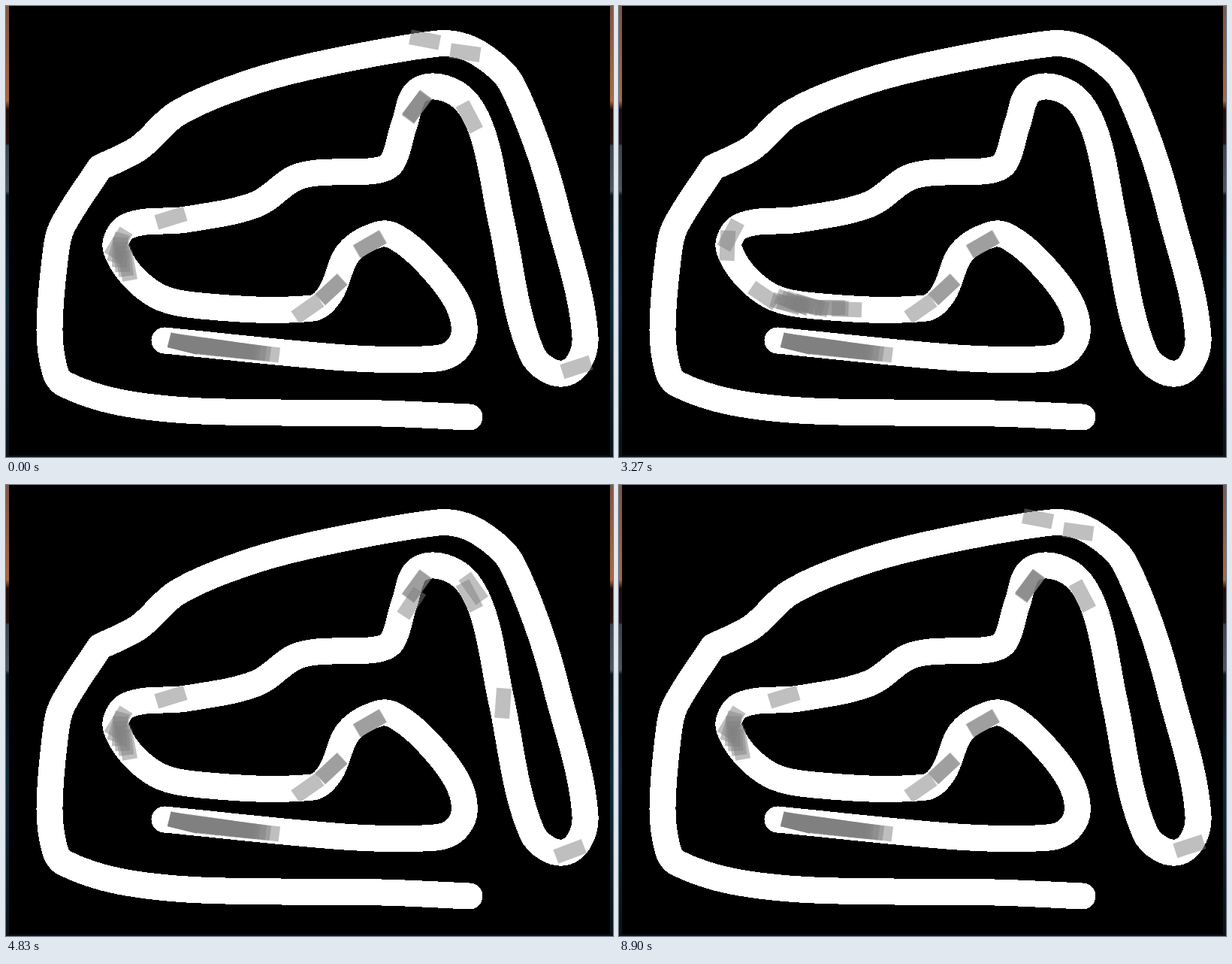
An HTML page for the animation above (8.96 s loop, 808x600 px).

```html
<!DOCTYPE html>
<html lang="en">
<head>
<meta charset="utf-8">
<title>Track</title>
<style>
  html, body { margin: 0; width: 100%; height: 100%; overflow: hidden; background: #000; }
  svg { display: block; width: 808px; height: 600px; }
  .road { fill: none; stroke: #fff; stroke-width: 35; stroke-linecap: round; stroke-linejoin: round; shape-rendering: crispEdges; }
  .car { fill: #808080; opacity: .5; }
</style>
</head>
<body>
<svg viewBox="0 0 808 600">
  <defs>
    <linearGradient id="sky" x1="0" y1="0" x2="0" y2="1">
      <stop offset="0" stop-color="#7e5546"/>
      <stop offset=".21" stop-color="#a8693f"/>
      <stop offset=".23" stop-color="#1c0d0a"/>
      <stop offset=".305" stop-color="#241210"/>
      <stop offset=".31" stop-color="#3a4450"/>
      <stop offset=".41" stop-color="#4c555c"/>
      <stop offset=".42" stop-color="#0a161c"/>
      <stop offset=".65" stop-color="#112a3c"/>
      <stop offset="1" stop-color="#0a1418"/>
    </linearGradient>
  </defs>
  <rect width="808" height="600" fill="url(#sky)"/>
  <rect x="4" width="800" height="598"/>
  <path class="road" id="lap"/>
  <path class="road" id="back"/>
  <g id="cars"></g>
</svg>
<script>
const LOOP = 8960, START = 33, MID = 1700, BEND = 2470;

const lapPoints = `211,445 450,468 555,470 592,463 610,436 600,393 560,341 520,308 496,304 456,328
  432,382 408,402 260,399 195,382 147,325 162,293 240,284 333,264 392,226 492,219 514,208 530,158
  551,111 602,118 634,168 659,285 700,462 746,488 771,440 732,268 707,185 672,102 648,76 613,55
  575,50 430,75 325,102 228,143 177,189 125,215`;
const backPoints = '125,215 75,293 66,330 58,430 65,485 78,503 150,527 260,539 500,542 617,547';

// Smooth curve: tangents follow the neighbours' chord, handles a third of the segment
function spline(text) {
  const p = text.trim().split(/\s+/).map(s => s.split(',').map(Number));
  const handle = (i, size) => {
    const a = p[Math.max(0, i - 1)], b = p[Math.min(p.length - 1, i + 1)];
    const k = size / Math.hypot(b[0] - a[0], b[1] - a[1]);
    return p[i].map((v, j) => v + k * (b[j] - a[j]));
  };
  let d = 'M' + p[0];
  for (let i = 0; i < p.length - 1; i++) {
    const third = Math.hypot(p[i + 1][0] - p[i][0], p[i + 1][1] - p[i][1]) / 3;
    d += 'C' + [handle(i, third), handle(i + 1, -third), p[i + 1]].join(' ');
  }
  return d;
}

const lap = document.getElementById('lap');
lap.setAttribute('d', spline(lapPoints));
document.getElementById('back').setAttribute('d', spline(backPoints));

const samples = [];
for (let s = 0; s <= lap.getTotalLength(); s += 2) {
  const { x, y } = lap.getPointAtLength(s);
  samples.push([x, y]);
}

// Position and heading at distance s
function road(s) {
  const end = samples.length - 1;
  const f = Math.max(0, Math.min(end - .001, s / 2));
  const i = Math.floor(f), k = f - i;
  const [ax, ay] = samples[i], [bx, by] = samples[i + 1];
  const c = samples[Math.max(0, i - 3)], e = samples[Math.min(end, i + 4)];
  return { x: ax + (bx - ax) * k, y: ay + (by - ay) * k, a: Math.atan2(e[1] - c[1], e[0] - c[0]) };
}

// Stage pose as distance, sideways offset and turn relative to the road
function pose(x, y, deg) {
  const gaps = samples.map(([px, py]) => Math.hypot(px - x, py - y));
  const s = 2 * gaps.indexOf(Math.min(...gaps)), r = road(s);
  const side = (y - r.y) * Math.cos(r.a) - (x - r.x) * Math.sin(r.a);
  const turn = deg - r.a * 180 / Math.PI;
  return { s, side, turn: turn - 180 * Math.round(turn / 180) };
}

const noise = i => { const v = Math.sin(i * 12.9898) * 43758.5453; return (v - Math.floor(v)) * 2 - 1; };
const grid = { t: START, ...pose(236, 449, 14) };
const cars = [];

// Slow cars stall along the first straight, thinning out at its end
for (let i = -4; i <= 30; i++) {
  const q = Math.max(0, i / 30), f = .8 * q + .2 * q ** 12;
  const stall = { t: 950 + 400 * f, ...pose(236 + 107 * f, 449 + 13 * f, 14 - 7 * f) };
  cars.push({ keys: [grid, stall], power: 2.2 });
}

// Crash spots, with the pace in px/ms of each car that ends there; first in the pack first
const crashes = [
  { at: [557, 45, 11], paces: [.62] },
  { at: [547, 134, -54], paces: [.61, .466, .405] },
  { at: [759, 481, -18], paces: [.53] },
  { at: [617, 148, 62], paces: [.5] },
  { at: [484, 317, -30], paces: [.6, .58] },
  { at: [433, 377, -43], paces: [.6, .58] },
  { at: [401, 403, -35], paces: [.56] },
  { at: [162, 346, 80], paces: Array(6).fill(.54), gap: 7 },
  { at: [220, 282, -17], paces: [.52] },
  { at: [611, 62, 8], paces: [.5] }
];
const rear = pose(600, 405, 68), front = pose(535, 317, 42);
const field = crashes.flatMap(({ at, paces, gap = 1 }) =>
  paces.map((pace, j) => ({ crash: pose(...at), pace, slip: j * gap })));

field.forEach(({ crash, pace, slip }, i) => {
  const u = 1 - i / (field.length - 1);
  const bend = {
    t: BEND,
    s: rear.s + u * (front.s - rear.s),
    side: noise(i + 3) * 3.5 - 1.5,
    turn: noise(i + 40) * 5
  };
  // Exponent that also puts the car at its place in the pack at MID
  const power = Math.log((bend.s - grid.s) / (177 + 20 * u)) / Math.log((BEND - START) / (MID - START));
  const s = crash.s + slip;
  cars.push({ keys: [grid, bend, { ...crash, s, t: BEND + (s - bend.s) / pace }], power });
});

const layer = document.getElementById('cars');
for (const car of cars) {
  car.el = document.createElementNS('http://www.w3.org/2000/svg', 'rect');
  const attrs = { class: 'car', x: -20, y: -10, width: 40, height: 20 };
  for (const name in attrs) car.el.setAttribute(name, attrs[name]);
  layer.append(car.el);
}

function place({ keys, power, el }, t) {
  const i = keys.length > 2 && t >= BEND ? 1 : 0;
  const a = keys[i], b = keys[i + 1];
  const k = Math.max(0, Math.min(1, (t - a.t) / (b.t - a.t)));
  const s = a.s + (b.s - a.s) * (i ? k : k ** power);
  const fade = i ? k ** 4 : Math.min(1, 2 * k);
  const mix = name => a[name] + (b[name] - a[name]) * fade;
  const r = road(s), side = mix('side');
  const x = r.x - side * Math.sin(r.a), y = r.y + side * Math.cos(r.a);
  const deg = r.a * 180 / Math.PI + mix('turn');
  el.setAttribute('transform', `translate(${x.toFixed(2)} ${y.toFixed(2)}) rotate(${deg.toFixed(2)})`);
}

// 30 steps per second; the first step still shows the finished run
const origin = performance.now();
let last = -1;
function draw() {
  const step = Math.floor(((performance.now() - origin) % LOOP + 4) * .03);
  if (step !== last) {
    last = step;
    const t = step < 1 ? LOOP : step / .03;
    cars.forEach(car => place(car, t));
  }
  requestAnimationFrame(draw);
}
draw();
</script>
</body>
</html>
```
